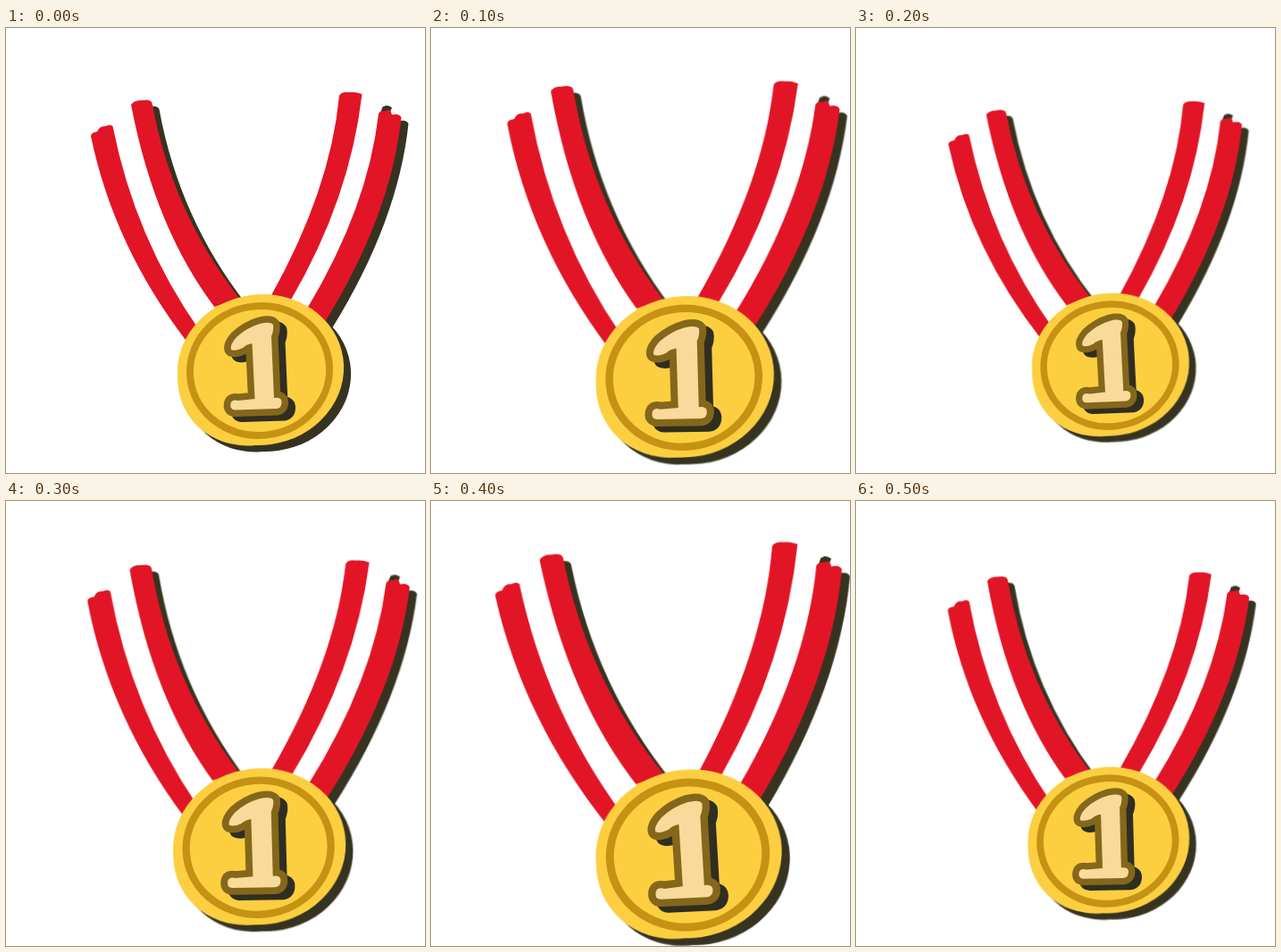
Animation of 469 by 498 pixels, one loop 600 ms. Source, as an HTML page:

```html
<!DOCTYPE html>
<html lang="en">
<head>
<meta charset="utf-8">
<title>First place medal</title>
<style>
  html, body { margin: 0; width: 100%; height: 100%; overflow: hidden; background: #fff; }
  svg { display: block; width: 469px; height: 498px; }
  .body { filter: drop-shadow(8px 7px 0 #363320); }
  .white { fill: #fff; }
  .red { fill: #e21526; }
  .gold { fill: #fbcf40; }
  .ring { fill: none; stroke: #c69214; stroke-width: 8; }
  .digit { fill: #f8da9a; stroke: #84671a; stroke-width: 15; stroke-linejoin: round; paint-order: stroke; }
  .shade { fill: #302e20; stroke: #302e20; }
</style>
</head>
<body>
<svg viewBox="0 0 469 498">
  <defs>
    <path id="one" d="M252 360Q250 355 258 346Q270 335 284 331Q296 328 299 332Q300 338 297 345L298.5 380L300 414Q308 413 308.500 418Q309 425 303 426L256 427.500Q250 427 251.500 420Q253 415 260 417L278.500 415L275.500 353Q269 354 265 358Q257 362 252 360Z"/>
  </defs>
  <g id="medal">
    <g class="body">
      <!-- left ribbon -->
      <path class="white" d="M118 110L142 85Q167 226 238 315L250 330L225 350L215 339Q143 236 118 110Z"/>
      <path class="red" d="M95 121Q95 117 102 116Q105 109 111 110Q117 107 119.500 110Q144.500 236 217 339L230 380L204 353Q121 246 95 121Z"/>
      <path class="red" d="M140 86Q143 81 151 81Q162 79 163.500 84Q186 206 260.500 301.500L270 340L235.500 315Q167 226 140 86Z"/>
      <!-- right ribbon -->
      <path class="white" d="M396 75L415 81Q418 78 424 82L419 95Q407 201 339 314L325 330L317 305Q383 191 396 75Z"/>
      <path class="red" d="M373 76Q375 71 385 72Q390 71 398.500 74Q385 191 319 304L300 330L296.500 300Q363 181 373 76Z"/>
      <path class="red" d="M417 96Q419 92 425 93Q430 89 432 97Q440 95 442.500 100Q431 209 357 329L340 340L337 314Q405 201 417 96Z"/>
      <!-- hand-drawn disc: two tilted ovals and a small corner -->
      <path class="gold" d="M233 312L245 308L255 318L238 322Z"/>
      <ellipse class="gold" cx="285" cy="382.5" rx="93.3" ry="84.3" transform="rotate(-8 285 382.5)"/>
      <ellipse class="gold" cx="280" cy="383" rx="91" ry="81" transform="rotate(-35 280 383)"/>
    </g>
    <ellipse class="ring" cx="284" cy="383.5" rx="78.2" ry="72.3" transform="rotate(-8 284 383.5)"/>
    <use href="#one" class="digit shade" x="8" y="6"/>
    <use href="#one" class="digit"/>
  </g>
</svg>
<script>
  const medal = document.getElementById("medal");
  const STEP = 100;
  // scale and turn in degrees around the knot of the ribbon
  const poses = [[1, 0], [1.07, 0.9], [0.946, -0.4], [1.037, 0.95], [1.118, -0.85], [0.97, 0.95]];

  function draw(now) {
    const [scale, turn] = poses[Math.floor(now / STEP) % poses.length];
    medal.setAttribute("transform",
      `translate(270 275) rotate(${turn}) scale(${scale}) translate(-270 -275)`);
  }

  const start = performance.now();
  function tick() {
    draw(performance.now() - start);
    requestAnimationFrame(tick);
  }
  tick();
</script>
</body>
</html>
```
